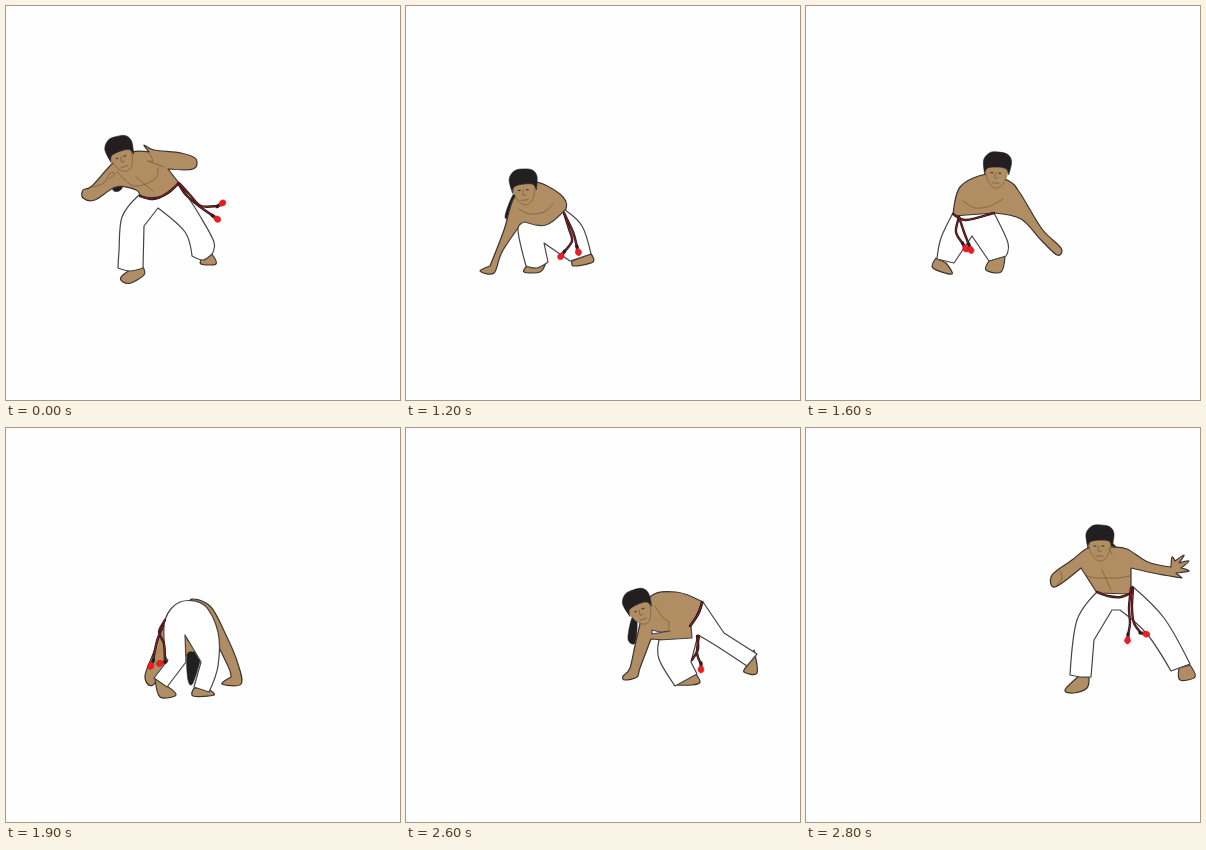
An HTML page that plays this animation: 394x394 px, repeating every 3300 ms.

```html
<!DOCTYPE html>
<html lang="en">
<head>
<meta charset="utf-8">
<title>Capoeira turn</title>
<style>
html, body { margin: 0; width: 100%; height: 100%; overflow: hidden; background: #fefefe; }
svg { display: block; width: 100%; height: 100%; }
path { stroke-linejoin: round; stroke-linecap: round; fill: none; }
.skin { fill: #b08d62; stroke: #3a3531; stroke-width: 1.2; }
.face { fill: #b08d62; stroke: #80623c; stroke-width: .7; }
.pants { fill: #fff; stroke: #454545; stroke-width: 1.2; }
.hair { fill: #231f20; stroke: #231f20; stroke-width: .6; }
.tip { fill: #ed1c24; stroke: #c4161c; stroke-width: .6; }
.line { stroke: #7d5f3a; stroke-width: .8; }
.eye { stroke: #3a2a1c; stroke-width: 1; }
.edge { stroke: #2a1517; stroke-width: 2.4; }
.cord { stroke: #7c2326; stroke-width: 1.1; }
.knot { stroke: #231f20; stroke-width: 3.4; }

/* One keyframe set per hold length; the delay sets the start. */
.pose { visibility: hidden; animation: 3300ms step-end infinite; }
@keyframes hold1000 { 0% { visibility: visible } 30.30303% { visibility: hidden } }
@keyframes hold500 { 0% { visibility: visible } 15.15152% { visibility: hidden } }
@keyframes hold200 { 0% { visibility: visible } 6.06061% { visibility: hidden } }
@keyframes hold100 { 0% { visibility: visible } 3.03030% { visibility: hidden } }
</style>
</head>
<body>
<svg id="stage" viewBox="0 0 394 394"></svg>
<script>
const stage = document.getElementById('stage');
let layer;

function node(tag, attrs, parent) {
  const el = document.createElementNS('http://www.w3.org/2000/svg', tag);
  for (const name in attrs) el.setAttribute(name, attrs[name]);
  return parent.appendChild(el);
}

// Smooth curve through the points; "!" marks a sharp corner.
function curve(text, loop) {
  const pts = text.split(' ').map(w => ({ p: w.replace('!', '').split(',').map(Number), sharp: w.endsWith('!') }));
  const n = pts.length;
  const at = i => pts[loop ? (i + n) % n : Math.max(0, Math.min(n - 1, i))];
  const handle = (i, dir) => {
    const { p, sharp } = at(i), a = at(i - 1).p, b = at(i + 1).p;
    return p.map((v, k) => sharp ? v : v + dir * (b[k] - a[k]) / 6);
  };
  let d = 'M' + pts[0].p;
  for (let i = 0; i < (loop ? n : n - 1); i++)
    d += `C${handle(i, 1)} ${handle(i + 1, -1)} ${at(i + 1).p}`;
  return loop ? d + 'Z' : d;
}

const shape = (kind, loop) => (text, parent = layer) => node('path', { class: kind, d: curve(text, loop) }, parent);
const skin = shape('skin', true), pants = shape('pants', true), hair = shape('hair', true);
const face = shape('face', true), tip = shape('tip', true);
const line = shape('line'), eye = shape('eye'), edge = shape('edge'), cord = shape('cord'), knot = shape('knot');

function belt(text) {
  edge(text);
  cord(text);
}

// Cord with a tassel that follows its last stretch unless turned.
function rope(text, turn) {
  belt(text);
  const [a, b] = text.split(' ').slice(-2).map(w => w.split(',').map(Number));
  const angle = turn ?? Math.atan2(b[1] - a[1], b[0] - a[0]) * 180 / Math.PI;
  const g = node('g', { transform: `translate(${b}) rotate(${angle})` }, layer);
  tip('1,-1! 6,-3 9,0 6,3 1,1!', g);
  knot('-1,0 0,0', g);
}

function head(x, y, tilt) {
  const g = node('g', { transform: `translate(${x} ${y}) rotate(${tilt})` }, layer);
  face('-11,-1 -1,-3 10,-1 9,9 5,16 -1,18 -8,12', g);
  hair('-12,5! -14,-9 -8,-17 1,-18 10,-16 14,-9 12,4! 9,-2 -1,-3 -10,-1', g);
  eye('-6,3 -4,3', g);
  eye('2,3 4,3', g);
  line('-1,3 -2,8 1,8', g);
  line('-4,13 3,13', g);
}

function pose(start, hold) {
  layer = node('g', { class: 'pose', style: `animation-name:hold${hold};animation-delay:${start}ms` }, stage);
}

// Ready stance
pose(0, 1000);
hair('106,180 108,185 113,185 116,181');
skin('124,264! 115,271 117,276 125,277 138,269 137,261!');
skin('196,252! 195,258 210,258 206,248!');
skin('107,157 86,180 77,184 77,192 89,194 110,181 130,184 134,191! 158,190 173,177! 162,163! 187,163 190,153 175,147 148,144 138,139 143,146! 126,146');
pants('133,189! 116,211 113,245 112,262! 124,265 137,262! 138,220! 152,202! 179,226 186,250! 197,254 206,248! 208,236 194,210 173,177! 163,187 148,193');
head(115, 148, -18);
line('111,166 128,180 149,173 152,162');
line('130,171 147,185');
line('87,181 98,177 104,167 109,168 103,173');
line('143,147 147,155 142,155 158,161');
belt('134,190 147,193 160,188 173,177');
rope('172,177 180,189 193,200 207,210');
rope('174,178 184,189 195,200 212,200', -34);

// Drop with one hand down
pose(1000, 200);
hair('84,203 92,205 90,229 80,229 85,213');
skin('117,271! 115,277 121,280 139,269 136,263!');
skin('171,254! 172,258 185,259 189,238 185,234!');
skin('102,188 126,186 156,198! 146,217 118,220 97,230! 95,262 85,269 78,267! 75,262 86,261! 88,245 92,207');
pants('98,223! 97,241 109,273! 122,273 137,265! 119,238! 147,233 159,251! 181,255 185,234! 174,235! 171,220 156,199! 146,217 118,220');
head(92, 194, -24);
line('104,207 112,212 125,212 113,202');
line('138,219 147,215 154,206');
rope('155,206 160,222 166,236 177,247', 75);
rope('155,205 164,224 170,237 164,249', 145);

// Shift onto both feet
pose(1200, 200);
hair('107,189 112,193 108,210 99,211');
skin('121,260! 118,266 134,266 140,256!');
skin('166,255! 168,260 187,256 185,248!');
skin('127,176 154,188 160,203 143,219 115,218! 96,246 88,267 74,265 84,260! 98,224 108,192');
pants('119,216! 112,224 120,260! 131,262 142,256! 138,237! 164,255! 185,248! 176,220 159,204! 140,219');
head(118, 181, -6);
line('113,203 124,208 138,206 147,198');
rope('158,207 163,223 166,235 158,246');
rope('158,207 167,226 171,241');

// Low squat
pose(1400, 200);
rope('168,230 168,242 162,249 154,252', 180);
rope('160,229 162,240 159,248 154,252', 180);
skin('130,238! 130,255 143,262 148,257 136,246!');
skin('144,168 124,177 114,197 105,212 113,214 122,203! 124,214! 156,211! 180,214 191,235 210,230 210,226 193,225 182,201 173,177');
pants('124,213! 123,222 134,237! 141,255! 162,239! 160,230! 168,231! 173,254! 196,240! 185,215 163,207 156,210! 140,216');
skin('179,250! 177,260 182,265 198,248 198,241 190,241');
head(155, 165, 5);
line('126,195 136,202 148,202 165,190');
line('150,193 145,209');
line('117,190 122,188 119,193 124,196');
line('160,230 152,222 145,218');
belt('124,213 140,216 156,210');

// Reach across
pose(1600, 200);
hair('197,176 203,181 198,199 194,190');
skin('130,252! 127,262 146,268 140,257!');
skin('183,255! 180,264 195,266 199,250!');
skin('181,168 154,181 147,210! 188,207! 215,213 235,234 251,249 255,242 236,223 214,187 203,175');
pants('147,207! 135,232 131,253! 148,257! 166,230! 183,255! 200,250! 202,237 188,207! 160,214');
head(191, 164, 4);
line('157,195 169,202 184,200 197,193');
belt('147,208 160,214 188,207');
rope('153,211 150,226 157,238');
rope('153,211 158,226 163,239');

// Fold over both hands
pose(1800, 100);
skin('185,174 216,184 244,222 269,255 247,255 226,225 217,219! 216,253 201,256 201,222');
head(215, 218, 160);
skin('139,252! 136,260 153,268 149,257!');
skin('183,255! 187,269 203,262 198,254!');
pants('156,193! 175,173 200,184 207,217 200,256! 182,256! 173,213! 152,259! 138,251! 145,237');
belt('157,191 168,198 187,197 200,184');
rope('163,196 155,210 158,225');
rope('161,196 150,213 149,228');

// Bridge seen from behind
pose(1900, 500);
skin('184,173 204,178 220,207 232,236 235,256 216,256 225,249! 222,238 205,205');
skin('160,190 149,221 139,248 147,257 163,232 165,210');
face('179,206 186,210 190,227 180,227');
hair('181,227 188,224 195,227 187,255 182,252');
eye('181,211 182,213');
eye('185,217 187,218');
skin('149,250! 154,269 170,267 161,258!');
skin('188,260! 187,268 208,267 202,261!');
pants('159,192 174,174 198,177 212,204 212,238 203,264! 188,259! 195,234! 179,207! 180,234! 161,259! 148,250! 162,232! 159,225');
rope('159,192 153,204 158,216 159,234', 165);
rope('157,198 151,213 147,233', 115);

// Turn out
pose(2400, 100);
skin('222,214! 226,249 214,255 233,256 229,214!');
rope('217,211 221,223 226,232');
rope('220,211 214,224 211,231', 155);
hair('190,246 195,239 198,241 196,246');
skin('164,205 190,187 218,172 240,179! 207,196 189,214 176,207 175,236 167,240');
face('181,210 188,207 193,212 191,222 185,224');
hair('174,214 184,208 189,213 182,228 175,224');
line('185,194 198,191 207,196');
line('189,211 192,216 188,217');
skin('178,251! 160,266 161,273 173,269 180,255!');
skin('259,249! 258,259 269,261 266,248!');
pants('209,183! 222,178 239,179! 246,203 267,249! 249,262! 234,230 222,209! 205,229 179,256! 163,244! 182,230 202,195');
skin('221,214! 222,209 226,211 228,218!');
belt('209,184 216,179 226,177 237,178');

// Travel to the right
pose(2500, 100);
hair('197,214 203,216 201,238 196,234');
skin('208,262! 204,270 210,275 227,266 224,258!');
skin('288,250! 290,262 302,257 298,247!');
skin('207,191 235,171 267,178! 252,203 220,214! 202,258 187,257 198,235');
pants('266,178! 278,203 299,246! 285,255! 250,216! 225,264! 207,260! 224,220 253,200');
head(209, 205, -20);
line('224,201 231,208 243,207');
belt('267,178 262,192 240,207');
rope('258,198 259,213 254,224');
rope('258,198 264,215 263,228');

// Low on one hand
pose(2600, 100);
hair('226,190 231,194 229,215 222,211');
skin('268,257! 286,257 294,254 289,245!');
skin('348,222! 351,245 338,244 341,238!');
skin('243,170 270,164 297,174! 285,198! 284,211 245,211! 234,240 231,249 219,252 217,248 224,240 231,209');
pants('297,174! 318,205! 351,226! 341,238! 309,217 292,207! 285,234! 291,246! 269,258! 253,231 253,212! 286,210! 285,198! 293,186');
pants('246,202! 254,204! 264,203! 246,206!');
head(233, 179, -22);
line('249,178 257,190 263,194 262,201');
belt('296,174 292,186 284,198');
belt('291,208 292,221 286,232');
rope('293,208 291,225 295,236', 90);

// Rise
pose(2700, 100);
hair('247,154 252,157 246,177 243,170');
skin('268,253! 259,261 264,266 283,258 283,251!');
skin('364,232! 364,245 377,241 373,231!');
skin('266,142 297,143 318,170! 282,181! 249,203 231,211 243,194 254,160');
skin('297,144! 328,162 351,174 339,181 309,164!');
pants('282,180! 264,210 267,254! 285,251! 302,204! 363,242! 375,229! 346,194 317,170! 295,186');
head(262, 144, -10);
line('269,164 282,169 306,159');
belt('282,181 295,186 318,170');
rope('314,178 313,193 307,207');
rope('314,178 315,196 319,209');

// Stance on the other side
pose(2800, 500);
skin('273,248! 259,262 268,265 281,260 283,248!');
skin('373,240! 374,252 389,249 384,237!');
skin('284,119 266,132 246,147 249,159 275,140! 291,165! 325,166! 325,140! 352,146 376,150! 370,145! 383,143 375,140! 383,133 373,135! 378,127 369,133! 366,129 365,139! 342,134 321,121 305,119');
hair('304,117 310,119 306,115');
pants('291,164! 271,192 264,247! 275,249 285,249! 288,212! 306,182! 314,182! 341,206 365,243! 384,236! 358,190 326,158! 325,166! 308,169');
head(294, 115, 0);
line('276,141 284,149 310,150 324,148');
line('296,142 305,162');
line('254,143 256,150 251,157');
line('303,120 306,126');
belt('291,164 302,168 315,169 325,165');
rope('325,160 323,180 324,195 322,207', 95);
rope('327,160 326,180 328,195 335,205', 12);
</script>
</body>
</html>
```
